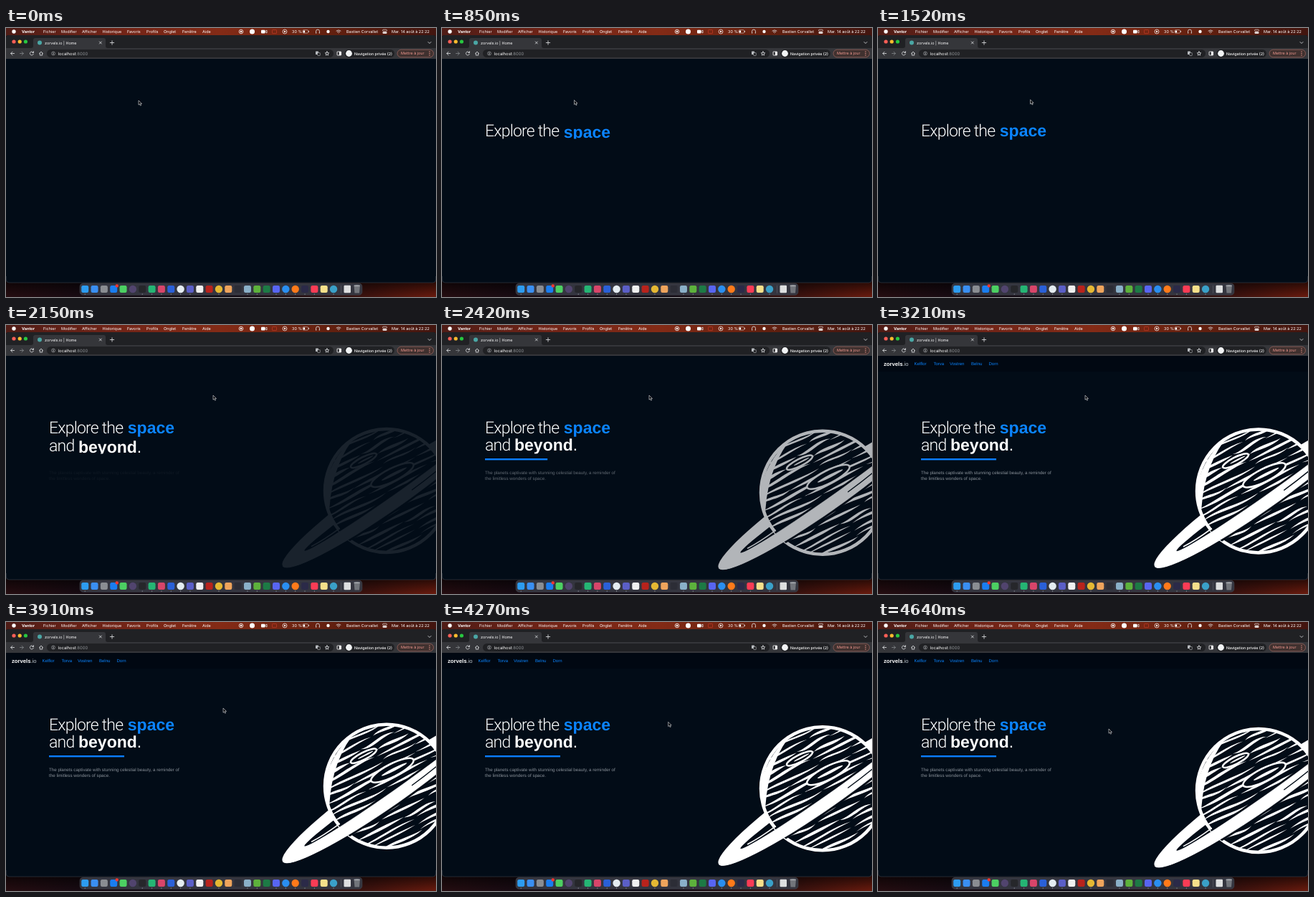
Recreate the animation shown at these times as an HTML page. Size 600 px wide and 375 px high, loop 4.67 s.

```html
<!DOCTYPE html>
<html lang="fr">
<head>
<meta charset="utf-8">
<title>zorvels.io | Home</title>
<style>
html, body { margin: 0; width: 100%; height: 100%; overflow: hidden; background: #020c17; }
svg { display: block; width: 600px; height: 375px; }
text { white-space: pre; text-rendering: geometricPrecision; }
.ui { font-family: Inter, sans-serif; font-size: 5.5px; fill: #fff; }
.copy { font-family: "Liberation Sans", Arial, sans-serif; }
.thin { font-family: Roboto, sans-serif; font-weight: 300; font-size: 23px; letter-spacing: -.8px; fill: #fff; }
.bold { font-family: "Liberation Sans", Arial, sans-serif; font-weight: 700; font-size: 23px; fill: #fff; }
.line { fill: none; stroke: #e4e6e9; stroke-width: .8; stroke-linecap: round; stroke-linejoin: round; }
</style>
</head>
<body>
<svg id="stage" viewBox="0 0 600 375" xmlns="http://www.w3.org/2000/svg">
  <defs>
    <linearGradient id="menuBg">
      <stop offset="0" stop-color="#4f1c16"/><stop offset=".25" stop-color="#712417"/>
      <stop offset=".5" stop-color="#842b16"/><stop offset=".75" stop-color="#63200f"/>
      <stop offset="1" stop-color="#42150f"/>
    </linearGradient>
    <linearGradient id="deskBg">
      <stop offset="0" stop-color="#260d11"/><stop offset=".17" stop-color="#180b13"/>
      <stop offset=".5" stop-color="#0e0b16"/><stop offset=".8" stop-color="#35110f"/>
      <stop offset="1" stop-color="#6b1b0e"/>
    </linearGradient>
    <linearGradient id="shade" x2="0" y2="1">
      <stop offset="0" stop-color="#000" stop-opacity=".65"/><stop offset="1" stop-color="#000" stop-opacity="0"/>
    </linearGradient>
    <clipPath id="pageClip"><rect y="43" width="600" height="312"/></clipPath>
    <clipPath id="row1"><rect id="row1Box" x="50" y="126" width="250" height="28.5"/></clipPath>
    <clipPath id="row2"><rect id="row2Box" x="50" y="157" width="250" height="22.5"/></clipPath>
    <clipPath id="disc"><circle r="87"/></clipPath>
  </defs>

  <rect width="600" height="375" fill="url(#deskBg)"/>
  <rect y="353" width="600" height="22" fill="url(#shade)"/>
  <rect width="600" height="11" fill="url(#menuBg)"/>
  <path d="M0 14a4 4 0 0 1 4-4H596a4 4 0 0 1 4 4V351a4 4 0 0 1-4 4H4a4 4 0 0 1-4-4Z" fill="#020c17"/>
  <path d="M.3 346V351a4 4 0 0 0 4 4H595.7a4 4 0 0 0 4-4V346" fill="none" stroke="#3b424c" stroke-width=".6"/>
  <path d="M0 43V14a4 4 0 0 1 4-4H596a4 4 0 0 1 4 4V43Z" fill="#202124"/>

  <g id="page" clip-path="url(#pageClip)">
    <g id="saturn"><g id="art" transform="translate(531 235)"></g></g>
    <g clip-path="url(#row1)">
      <text id="w0" class="thin" x="60" y="151.3">Explore the</text>
      <text id="w1" class="bold" x="169.8" y="151.3" style="fill:#0b84ff">space</text>
    </g>
    <g clip-path="url(#row2)">
      <text id="w2" class="thin" x="60" y="175.2">and</text>
      <text id="w3" class="bold" x="101" y="175.2">beyond<tspan font-weight="400">.</tspan></text>
    </g>
    <rect id="bar" x="60" y="186" width="105" height="2.4" fill="#0b7dff"/>
    <g id="para" class="copy" font-size="6.24" fill="#8b929a">
      <text x="60" y="208">The planets captivate with stunning celestial beauty, a reminder of</text>
      <text x="60" y="216.3">the limitless wonders of space.</text>
    </g>
    <g id="nav" class="copy" font-size="6" fill="#0b84ff"></g>
  </g>

  <g id="tabs"></g>
  <g id="menu"></g>
  <g id="dock"></g>
  <path id="arrow" d="M0 0V6.2L1.5 4.9L2.5 7.2L3.6 6.7L2.6 4.5H4.5Z" fill="#05070a" stroke="#e6e8ea" stroke-width=".6" stroke-linejoin="round"/>
</svg>
<script>
const LOOP = 4670, PAGE = '#020c17';
const $ = id => document.getElementById(id);

function add(parent, tag, attrs, body) {
  const el = document.createElementNS('http://www.w3.org/2000/svg', tag);
  for (const k in attrs) el.setAttribute(k, attrs[k]);
  if (body) el.textContent = body;
  (typeof parent === 'string' ? $(parent) : parent).appendChild(el);
  return el;
}
const label = (p, x, y, s, extra) => add(p, 'text', { class: 'ui', x, y, ...extra }, s);
const dot = (p, cx, cy, r, fill, extra) => add(p, 'circle', { cx, cy, r, fill, ...extra });
const box = (p, x, y, width, height, rx, fill, extra) => add(p, 'rect', { x, y, width, height, rx, fill, ...extra });
const line = (p, d, extra) => add(p, 'path', { class: 'line', d, ...extra });

function buildMenu() {
  dot('menu', 11, 5, 2.7, '#fff');
  label('menu', 22, 7, 'Vantor', { 'font-weight': 700 });
  [[52, 'Fichier'], [77, 'Modifier'], [106, 'Afficher'], [134.5, 'Historique'], [169, 'Favoris'],
   [196, 'Profils'], [220, 'Onglet'], [246, 'Fenêtre'], [274, 'Aide'], [399, '30 %'],
   [475, 'Bastien Corvallet'], [538, 'Mar. 14 août à 22:22']].forEach(([x, s]) => label('menu', x, 7, s));
  dot('menu', 328, 5, 2.8, 'none', { stroke: '#fff', 'stroke-width': .8 });
  dot('menu', 328, 5, 1.3, '#fff');
  dot('menu', 343.5, 5, 3.5, '#fff');
  box('menu', 356, 2.8, 5.5, 4.6, 1, '#fff');
  line('menu', 'M362 4.3L364 3.2V7L362 5.9Z');
  box('menu', 371.5, 2.6, 6, 5, .6, 'none', { stroke: '#c33b27', 'stroke-width': .7 });
  dot('menu', 389, 5, 3, 'none', { stroke: '#fff', 'stroke-width': .7 });
  add('menu', 'path', { d: 'M388 3.5L391 5L388 6.5Z', fill: '#fff' });
  box('menu', 414, 2.7, 7.6, 4.4, 1.2, 'none', { stroke: '#d8c4bf', 'stroke-width': .6 });
  box('menu', 414.7, 3.4, 2.4, 3, .5, '#fff');
  line('menu', 'M422.5 4.2V5.6');
  line('menu', 'M432.5 6V4.6A2.5 2.5 0 0 1 437.5 4.6V6M432.7 6V7.4M437.3 6V7.4', { 'stroke-width': 1 });
  dot('menu', 449.5, 5, 2.2, '#fff');
  line('menu', 'M461 4Q464 1.6 467 4M462.3 5.5Q464 4.1 465.7 5.5M464 7V7.1', { 'stroke-width': .9 });
  box('menu', 525.5, 2.2, 6, 2.4, 1.2, 'none', { stroke: '#fff', 'stroke-width': .6 });
  box('menu', 525.5, 5.4, 6, 2.4, 1.2, '#fff');
}

function buildTabs() {
  ['#ff5f57', '#febc2e', '#28c840'].forEach((c, i) => dot('tabs', 11 + 8.2 * i, 19, 2.6, c));
  add('tabs', 'path', { d: 'M35 28Q38 28 38 25V17Q38 14 41 14H136Q139 14 139 17V25Q139 28 142 28H600V43H0V28Z', fill: '#35363a' });
  dot('tabs', 47, 20.5, 3, '#4aa7a5');
  label('tabs', 54, 22.5, 'zorvels.io | Home', { style: 'font-size:5.4px' });
  line('tabs', 'M130.3 19L133.3 22M133.3 19L130.3 22');
  line('tabs', 'M145.3 20.5H150.7M148 17.8V23.2');
  line('tabs', 'M589 19.5L591 21.5L593 19.5');
  line('tabs', 'M11.5 35.5H6.8M9 33.2L6.7 35.5L9 37.8');
  line('tabs', 'M19.5 35.5H24.3M22 33.2L24.3 35.5L22 37.8', { style: 'stroke:#85888c' });
  line('tabs', 'M38 34A2.5 2.5 0 1 0 38.3 36.3M38.5 32.7V34.5H36.7');
  line('tabs', 'M46.6 35.4L49 33L51.4 35.4M47.3 35V38H50.7V35');
  box('tabs', 57, 30, 400, 11, 5.5, '#202124');
  dot('tabs', 66, 35.5, 2.5, 'none', { stroke: '#aeb1b5', 'stroke-width': .6 });
  line('tabs', 'M66 35.3V36.7M66 34.2V34.2', { 'stroke-width': .6 });
  const url = label('tabs', 72.5, 37.5, 'localhost', { style: 'font-size:5.9px' });
  add(url, 'tspan', { fill: '#8f9397' }, ':8000');
  box('tabs', 432, 32.5, 4, 4.5, .6, '#b9bcc0');
  box('tabs', 434.7, 34.5, 3.6, 4, .6, '#202124', { stroke: '#b9bcc0', 'stroke-width': .6 });
  const star = [...Array(10)].map((_, i) => {
    const a = i * Math.PI / 5 - Math.PI / 2, r = i % 2 ? 1.3 : 2.9;
    return (448 + r * Math.cos(a)).toFixed(2) + ' ' + (35.7 + r * Math.sin(a)).toFixed(2);
  });
  line('tabs', 'M' + star.join('L') + 'Z', { 'stroke-width': .6 });
  box('tabs', 462, 33, 5.6, 5, .6, 'none', { stroke: '#fff', 'stroke-width': .8 });
  box('tabs', 465, 33, 2.6, 5, .3, '#fff');
  box('tabs', 472.5, 30, 69.5, 11, 5.5, '#202124');
  dot('tabs', 478.5, 35.5, 4.4, '#f1f3f4');
  label('tabs', 486, 37.5, 'Navigation privée (2)', { style: 'font-size:5.3px', 'font-weight': 500 });
  box('tabs', 546, 30.2, 50.5, 10.6, 5.3, '#40312f', { stroke: '#b5736b', 'stroke-width': .6 });
  label('tabs', 551, 37.4, 'Mettre à jour', { style: 'font-size:5.4px;fill:#f0988f' });
  [33, 35.5, 38].forEach(y => dot('tabs', 591, y, .65, '#f0988f'));
}

function buildNav() {
  box('nav', 0, 43, 600, 22, 0, '#010812');
  const logo = add('nav', 'text', { x: 8, y: 56.6, 'font-size': 7.7, fill: '#fff', 'font-weight': 700 }, 'zorvels');
  add(logo, 'tspan', { 'font-weight': 400, fill: '#c4c9ce' }, '.io');
  [[50.5, 'Kelflor'], [77.5, 'Torva'], [100, 'Vostren'], [130, 'Belnu'], [154.5, 'Dorn']]
    .forEach(([x, s]) => add('nav', 'text', { x, y: 56 }, s));
}

function buildDock() {
  box('dock', 103, 356, 394, 16.3, 4.5, '#34353f', { stroke: '#50515a', 'stroke-width': .4 });
  const tones = ('2d9cf0 3a8ff2 8a8d92 1a7df0 4cd062 51446e 26272b 25b574 d8456a 2a60d8 e4ecf1 5b5fc7 f0f0f0 ' +
    'b8231c e5b833 efa45c 2c2d36 8ab0c8 5db23c 1d7a45 5865f2 2a8ef0 ff7a1a 2b2a48 fa3c55 f5e08a 3aa0c8').split(' ');
  const round = [5, 10, 14, 21, 22, 26], open = [0, 6, 7, 8, 9, 10, 11, 14, 17, 18, 20, 21, 22, 23, 24, 26];
  tones.forEach((c, i) => {
    const x = 110.2 + 13.34 * i;
    if (round.includes(i)) dot('dock', x, 364, 5.2, '#' + c);
    else box('dock', x - 5, 359, 10, 10, 2.3, '#' + c);
    if (open.includes(i)) dot('dock', x, 371, .6, '#b9bbc2');
  });
  dot('dock', 154.8, 359.4, 2.2, '#f5362f');
  line('dock', 'M467.5 359V369.5', { style: 'stroke:#666872;stroke-width:.5' });
  box('dock', 471.5, 358.8, 9.5, 10.5, 1.2, '#dedfe0');
  add('dock', 'path', { d: 'M485.5 359H494L493 369.4H486.5Z', fill: '#72757b' });
  add('dock', 'ellipse', { cx: 489.75, cy: 359.2, rx: 4.3, ry: 1, fill: '#a6a9ae' });
}

function buildSaturn() {
  let seed = 11;
  const rnd = (a, b) => a + (b - a) * ((seed = seed * 16807 % 2147483647) / 2147483647);
  // tapered, wavy stroke of wood grain
  const grain = (x, y, len, h, bend) =>
    `M${x} ${y}C${x + len * .3} ${y - h - bend} ${x + len * .65} ${y - h + bend} ${x + len} ${y}` +
    `C${x + len * .65} ${y + h + bend} ${x + len * .3} ${y + h - bend} ${x} ${y}Z`;
  const arc = (rx, ry, dir) => `A${rx} ${ry} 0 0 ${dir} `;
  const tilt = 'rotate(-35) translate(0 3)';
  const front = `M-179 0${arc(179, 25, 0)}179 0H142${arc(142, 8, 1)}-142 0Z`;

  add('art', 'path', { transform: tilt, fill: '#fff', 'fill-rule': 'evenodd',
    d: `M-179 0${arc(179, 25, 1)}179 0${arc(179, 25, 1)}-179 0ZM-142 0${arc(142, 8, 1)}142 0${arc(142, 8, 1)}-142 0Z` });
  dot('art', 0, 0, 86, PAGE, { stroke: '#fff', 'stroke-width': 4.5 });
  const disc = add('art', 'g', { 'clip-path': 'url(#disc)' });

  let d = '';
  for (let v = -80; v < 84; v += 9.2) {
    const w = Math.sqrt(Math.max(0, 7400 - v * v));
    let x = -w - rnd(0, 12);
    while (x < w) {
      const len = rnd(38, 100);
      d += grain(x, v + rnd(-1.5, 1.5), len, rnd(1.6, 2.9), rnd(-6, 6));
      x += len + rnd(-4, 6);
    }
  }
  add(disc, 'path', { d, fill: '#fff', transform: 'rotate(-27)' });
  // swirls and the heavy limb
  [[8, -22, 33, 9], [-32, -42, 20, 5]].forEach(([cx, cy, rx, ry]) => {
    const transform = `rotate(-27 ${cx} ${cy})`;
    add(disc, 'ellipse', { cx, cy, rx, ry, transform, fill: PAGE, stroke: '#fff', 'stroke-width': 2.6 });
    add(disc, 'ellipse', { cx: cx + 3, cy, rx: rx * .6, ry: ry * .22, transform, fill: '#fff' });
  });
  add(disc, 'path', { d: 'M-86 26Q-94 -32 -40 -80Q-77 -38 -80 30Z', fill: '#fff' });

  add(disc, 'path', { transform: tilt, d: front, fill: PAGE, stroke: PAGE, 'stroke-width': 6 });
  add('art', 'path', { transform: tilt, d: front, fill: '#fff', stroke: '#fff', 'stroke-width': .6 });
  line('art', 'M30 16.5Q80 15.5 132 8', { transform: tilt, style: `stroke:${PAGE};stroke-width:1.4` });
  line('art', 'M-130 .5Q-112 3 -84 2.4', { transform: tilt, style: 'stroke:#fff;stroke-width:1.6' });
}

const span = (t, a, b) => Math.min(1, Math.max(0, (t - a) / (b - a)));
const smooth = u => u * u * (3 - 2 * u);
const rest = u => (1 - u) ** 3;

const starts = [250, 450, 1700, 1790];
const path = [[0, 185, 101], [850, 184.5, 100.5], [1300, 184.5, 100.5], [1950, 289, 98],
  [3450, 289, 98], [3910, 303, 120], [4450, 322, 149], [LOOP, 322, 149]];

function draw(t) {
  starts.forEach((s, i) => $('w' + i).setAttribute('transform', `translate(0 ${27 * rest(span(t, s, s + 700))})`));
  $('row1Box').setAttribute('height', t < 1150 ? 28.5 : 40);
  $('row2Box').setAttribute('height', t < 2490 ? 22.5 : 40);

  const shown = smooth(span(t, 2040, 2640));
  $('saturn').setAttribute('opacity', shown);
  $('saturn').setAttribute('transform', `translate(0 ${-3.5 * (1 - Math.cos(Math.PI * (t - 2700) / 1000))})`);
  $('para').setAttribute('opacity', shown);
  $('bar').setAttribute('width', 105 * (1 - rest(span(t, 2180, 2720))));
  $('nav').setAttribute('opacity', smooth(span(t, 2780, 3180)));

  const i = path.findIndex((k, n) => n && t <= k[0]);
  const a = path[i - 1], b = path[i], raw = span(t, a[0], b[0]);
  const u = i === 3 ? smooth(raw) : raw;
  $('arrow').setAttribute('transform', `translate(${a[1] + (b[1] - a[1]) * u} ${a[2] + (b[2] - a[2]) * u})`);
}

buildMenu();
buildTabs();
buildNav();
buildDock();
buildSaturn();

const begin = performance.now();
function tick() {
  draw((performance.now() - begin) % LOOP);
  requestAnimationFrame(tick);
}
draw(0);
requestAnimationFrame(tick);
</script>
</body>
</html>
```
